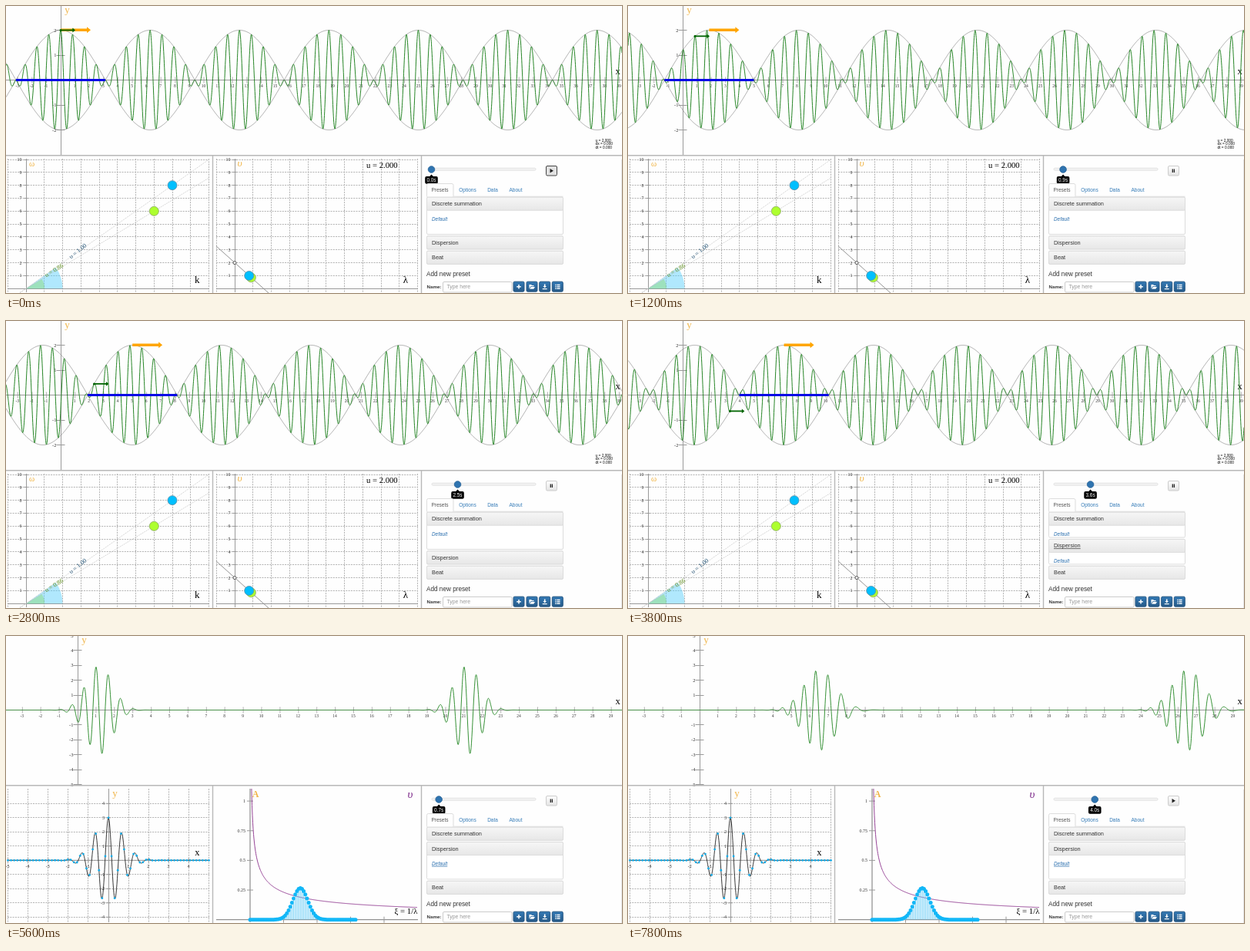
Animation, 800 px wide and 374 px high, one loop 8 s. Source, as an HTML page with a canvas:

```html
<!DOCTYPE html>
<html lang="en">
<head>
<meta charset="utf-8">
<title>Wave packets</title>
<style>
html, body { margin: 0; width: 100%; height: 100%; overflow: hidden; background: #fefefe; }
canvas { display: block; }
</style>
</head>
<body>
<canvas id="stage" width="800" height="374"></canvas>
<script>
const ctx = document.getElementById('stage').getContext('2d');
const SERIF = '"Liberation Serif", serif', SANS = '"Liberation Sans", sans-serif';
const GRAY = '#9a9a9a', INK = '#333', ORANGE = '#ffa500', AMBER = '#f0b548';
const SKY = '#00bfff', LIME = '#adff2f', LINK = '#337ab7';
const LOOP = 8, STEP = 0.2, SWITCH = 4.8, TAU = Math.PI * 2;

// [wall time, simulation time] in seconds
const BEAT_CLOCK = [[0.28, 0], [1.2, 0.93], [2.8, 2.52], [3.8, 3.56], [4.6, 4.335], [4.8, 4.53]];
const PACKET_CLOCK = [[4.885, 0], [7.2, 2.315], [7.8, 3.98]];

// Discrete spectrum of the packet 3 exp(-x²) cos(3πx), repeated every 20 units
const SPECTRUM = Array.from({ length: 64 }, (_, n) => {
  const xi = n * 0.05;
  return { xi, a: 0.2659 * Math.exp(-((xi - 1.5) ** 2) / (2 * 0.2251 ** 2)) };
});

function interpolate(points, time) {
  if (time <= points[0][0]) return points[0][1];
  for (let i = 1; i < points.length; i++) {
    const [x0, y0] = points[i - 1], [x1, y1] = points[i];
    if (time <= x1) return y0 + (y1 - y0) * (time - x0) / (x1 - x0);
  }
  return points[points.length - 1][1];
}

const range = (from, to, fn) => Array.from({ length: to - from + 1 }, (_, i) => fn(from + i));
const snap = v => Math.floor(v) + 0.5;

function text(str, x, y, size, color = '#000', { font = SERIF, align = 'center', style = '' } = {}) {
  ctx.font = `${style} ${size}px ${font}`;
  ctx.textAlign = align;
  ctx.textBaseline = 'alphabetic';
  ctx.fillStyle = color;
  ctx.fillText(str, x, y);
}

function line(x0, y0, x1, y1, color = GRAY, width = 1, dash = []) {
  ctx.beginPath();
  ctx.moveTo(x0, y0);
  ctx.lineTo(x1, y1);
  ctx.strokeStyle = color;
  ctx.lineWidth = width;
  ctx.setLineDash(dash);
  ctx.stroke();
  ctx.setLineDash([]);
}

function dot(x, y, r, fill, stroke) {
  ctx.beginPath();
  ctx.arc(x, y, r, 0, TAU);
  ctx.fillStyle = fill;
  ctx.fill();
  if (stroke) {
    ctx.strokeStyle = stroke;
    ctx.lineWidth = 0.8;
    ctx.stroke();
  }
}

function polygon(points, fill) {
  ctx.beginPath();
  points.forEach(([x, y]) => ctx.lineTo(x, y));
  ctx.fillStyle = fill;
  ctx.fill();
}

function box(x, y, w, h, fill, stroke, r = 0) {
  ctx.beginPath();
  ctx.roundRect(x, y, w, h, r);
  if (fill) { ctx.fillStyle = fill; ctx.fill(); }
  if (stroke) { ctx.strokeStyle = stroke; ctx.lineWidth = 1; ctx.stroke(); }
}

function shade(y, h, top, bottom) {
  const gradient = ctx.createLinearGradient(0, y, 0, y + h);
  gradient.addColorStop(0, top);
  gradient.addColorStop(1, bottom);
  return gradient;
}

function plot(fn, x0, x1, color, width = 1, step = 0.5) {
  ctx.beginPath();
  for (let x = x0; x <= x1; x += step) ctx.lineTo(x, fn(x));
  ctx.strokeStyle = color;
  ctx.lineWidth = width;
  ctx.stroke();
}

function clipped(x, y, w, h, draw) {
  ctx.save();
  ctx.beginPath();
  ctx.rect(x, y, w, h);
  ctx.clip();
  draw();
  ctx.restore();
}

function arrow(x, y, length, width, head, color) {
  line(x, y, x + length - head + 1, y, color, width);
  polygon([[x + length - head, y - head * 0.8], [x + length, y], [x + length - head, y + head * 0.8]], color);
}

function topAxes(ox, ux, uy, maxX, maxY) {
  line(0, 96.5, 800, 96.5);
  line(ox + 0.5, 0, ox + 0.5, 194);
  for (let i = -3; i <= maxX; i++) {
    if (!i) continue;
    line(ox + i * ux, 92.5, ox + i * ux, 100.5, GRAY, 0.8);
    text(i, ox + i * ux - 0.5, 106, 5.5, INK);
  }
  for (let i = -maxY; i <= maxY; i++) {
    if (!i) continue;
    line(ox - 5.5, snap(96.5 - i * uy), ox + 5.5, snap(96.5 - i * uy));
    text(i, ox - 5.5, 98.5 - i * uy, 6.5, INK, { align: 'right' });
  }
  text('y', ox + 8.5, 9, 13, AMBER);
  text('x', 794.5, 89, 12.5);
}

function grid(left, right, xs, ys) {
  const dash = [2, 1.3];
  xs.forEach(x => line(snap(x), 199, snap(x), 373, '#b2b2b2', 1, dash));
  ys.forEach(y => line(left, snap(y), right, snap(y), '#b2b2b2', 1, dash));
}

function gridPanel(ox, left, right) {
  const y = n => 368.3 - n * 16.83;
  grid(left, right, range(-1, 10, i => ox + i * 23.75).filter(x => x < right), range(1, 10, y));
  line(left, 368.5, right, 368.5);
  line(ox + 0.5, 199, ox + 0.5, 373);
  for (let i = 1; i <= 10; i++) {
    line(ox - 2.5, snap(y(i)), ox + 2.5, snap(y(i)));
    text(i, ox - 5.5, y(i) + 2, 6, INK, { align: 'right' });
  }
  return y;
}

function wedge(x, y, r, angle, fill) {
  ctx.beginPath();
  ctx.moveTo(x, y);
  ctx.arc(x, y, r, -angle, 0);
  ctx.closePath();
  ctx.fillStyle = fill;
  ctx.fill();
}

function rotatedText(str, x, y, angle, color) {
  ctx.save();
  ctx.translate(x, y);
  ctx.rotate(-angle);
  text(str, 0, 3, 8, color);
  ctx.restore();
}

function beatScene(t) {
  // The wave is drawn at a slightly finer scale than the tick marks
  const ox = 71, ux = 18.48, uy = 32.5, mid = 96.5;
  const toPixel = x => ox + x * ux, toUnit = p => (p - ox) / ux;
  const envelope = x => 2 * Math.cos((x - 2 * t) / 2);
  topAxes(ox, 18.6, uy, 39, 2);
  for (const sign of [1, -1]) plot(p => mid - sign * uy * envelope(toUnit(p)), 0, 800, '#8a8a8a', 0.7);
  plot(p => {
    const x = toUnit(p);
    return mid - uy * (Math.cos(8 * x - 8 * t) + Math.cos(7 * x - 6 * t));
  }, 0, 800, '#1b7f1b', 0.95, 0.25);

  line(toPixel(2 * t - Math.PI), mid, toPixel(2 * t + Math.PI), mid, '#0808e6', 3.2);
  arrow(toPixel(2 * t), 31.2, 39, 3.4, 5, ORANGE);
  const phaseX = 14 / 15 * t, phaseY = mid - uy * envelope(phaseX);
  dot(toPixel(phaseX), phaseY, 1.5, '#006400');
  arrow(toPixel(phaseX), phaseY, 19, 1.8, 3.6, '#006400');
  ['u = 2.000', 'dx = 0.000', 'dt = 0.000'].forEach((s, i) =>
    text(s, 765.5, 176.5 + i * 4.6, 4.8, '#000', { font: SANS, align: 'left' }));

  clipped(0, 196, 268, 178, () => {
    const y = gridPanel(26, 2, 264);
    const fast = Math.atan2(8 * 16.83, 8 * 23.75), slow = Math.atan2(6 * 16.83, 7 * 23.75);
    wedge(26, 368.3, 47.5, fast, 'rgba(80,205,250,.45)');
    wedge(26, 368.3, 24, slow, 'rgba(130,215,100,.42)');
    for (const a of [fast, slow])
      line(18, 368.3 + 8 * Math.tan(a), 264, 368.3 - 238 * Math.tan(a), '#bdbdbd', 0.8, [1, 1]);
    rotatedText('υ = 1.00', 93, 319, 0.68, '#1d4f73');
    rotatedText('υ = 0.86', 62, 344, 0.54, '#5f8f1a');
    dot(216, y(8), 6, SKY, '#5c8da5');
    dot(192.3, y(6), 6, LIME, '#8aa860');
    text('ω', 33.5, 208.7, 11, AMBER);
    text('k', 248.3, 361, 13);
  });

  clipped(270, 196, 268, 178, () => {
    const y = gridPanel(297, 273, 535);
    line(273, 312.9, 341.5, 374.5, '#888', 0.9);
    dot(297, y(2), 2, '#fff', '#333');
    dot(318.4, y(6 / 7), 6, LIME, '#8aa860');
    dot(315.7, y(1), 6, SKY, '#5c8da5');
    text('υ', 303.5, 209, 13.5, AMBER, { style: 'italic' });
    text('u = 2.000', 488.3, 211, 10.7);
    text('λ', 519, 361, 13);
  });
}

function packetScene(t) {
  const ox = 93, ux = 23.9, uy = 19.4;
  topAxes(ox, ux, uy, 29, 5);
  plot(p => {
    const x = (p - ox) / ux;
    let sum = 0;
    for (const { xi, a } of SPECTRUM) sum += a * Math.cos(TAU * (xi * x - 4 * Math.sqrt(xi) * t));
    return 96.5 - uy * sum;
  }, 0, 800, '#2c8c2c', 0.95);

  clipped(0, 196, 268, 178, () => {
    const cx = 133, cy = 292.3, sx = 26.1, sy = 18.5;
    const packet = x => 3 * Math.exp(-x * x) * Math.cos(3 * Math.PI * x);
    grid(2, 264, range(-5, 5, i => cx + i * sx), range(-4, 4, i => cy - i * sy));
    line(2, cy, 264, cy);
    line(cx + 0.5, 199, cx + 0.5, 373);
    for (let i = -5; i <= 4; i++) {
      if (!i) continue;
      line(cx + i * sx, cy - 3, cx + i * sx, cy + 3);
      text(i, cx + i * sx - 0.5, 302, 6, INK);
      if (i < -4) continue;
      line(cx - 3, cy - i * sy, cx + 3, cy - i * sy);
      text(i, cx - 5, cy - i * sy + 2, 6, INK, { align: 'right' });
    }
    plot(p => cy - sy * packet((p - cx) / sx), 2, 264, '#222', 0.9);
    for (let n = -32; n <= 32; n++) {
      const x = n * 0.15625;
      if (Math.abs(x) <= 5) dot(cx + x * sx, cy - sy * packet(x), 1.4, '#12abe8');
    }
    text('y', 141.5, 209, 13, AMBER);
    text('x', 248.3, 285.5, 12.5);
  });

  clipped(270, 196, 268, 178, () => {
    const cx = 317, base = 369.7, sx = 43.5, sy = 154.6;
    line(273, base, 535, base, '#777');
    line(cx, 199, cx, 373, '#777');
    for (let i = 1; i < 5; i++) {
      line(cx + i * sx, base - 4, cx + i * sx, base + 4);
      line(cx - 4, base - i * sy / 4, cx + 4, base - i * sy / 4);
      text(i / 4, cx - 6, base - i * sy / 4 + 2, 6, INK, { align: 'right' });
    }
    clipped(270, 199, 268, 175, () =>
      plot(p => base - 35.8 / Math.sqrt((p - cx) / sx), cx + 0.5, 534, '#8b2f8b', 0.9));
    for (const { xi, a } of SPECTRUM) {
      const x = cx + xi * sx, y = base - a * sy;
      line(x, base, x, y, '#58c8f5', 0.9);
      dot(x, y, 2.5, '#12b7f7');
    }
    text('A', 324, 209.5, 12, AMBER, { style: 'bold' });
    text('υ', 525, 211, 15, '#7d2a8a', { style: 'italic' });
    text('ξ = 1/λ', 519.5, 362, 10.8);
  });
}

function label(str, x, y, size, color, options = {}) {
  text(str, x, y, size, color, { font: SANS, align: 'left', ...options });
  if (options.underline) line(x, y + 1.3, x + ctx.measureText(str).width, y + 1.3, color, 0.7);
}

function section(title, y, bodyHeight, titleLine, linkLine) {
  box(546.5, y, 177, 17 + bodyHeight, '#fff', '#dcdcdc', 1.5);
  box(546.5, y, 177, 17, shade(y, 17, '#f6f6f6', '#e7e7e7'), '#dcdcdc', 1.5);
  label(title, 553, y + 10.9, 7.35, INK, { underline: titleLine });
  if (bodyHeight > 0) clipped(546, y + 17, 178, bodyHeight, () =>
    label('Default', 553, y + 30.3, 6.4, '#2a6fae', { style: 'italic', underline: linkLine }));
}

function iconButtons() {
  for (const x of [659, 676, 692.7, 709.3])
    box(x, 359.2, 14, 13, shade(359, 13, LINK, '#265a88'), '#245580', 1.5);
  const white = '#fff';
  line(663.2, 365.8, 668.8, 365.8, white, 1.5);
  line(666, 363, 666, 368.6, white, 1.5);
  polygon([[679.5, 363], [682, 363], [683, 364], [685.5, 364], [685.5, 365.3], [681.5, 365.3], [679.5, 368.5]], white);
  polygon([[682, 366], [687, 366], [685.3, 368.8], [680, 368.8]], white);
  line(699.7, 362.5, 699.7, 365.5, white, 1.6);
  polygon([[697.4, 365], [702, 365], [699.7, 367.6]], white);
  line(696.7, 368.7, 702.7, 368.7, white, 1.2);
  for (const y of [363.5, 365.9, 368.3]) line(713.2, y, 719.6, y, white, 1.4);
  line(715, 362, 715, 370, '#2c6a9f', 0.8);
}

function controls(time, t) {
  box(553, 211.2, 135, 3, '#f3f3f3', '#e2e2e2', 1.5);
  const x = 552.5 + 13.5 * t;
  dot(x, 213, 4.3, '#2f74b0', '#245f94');
  polygon([[x - 2.5, 222.3], [x, 219.5], [x + 2.5, 222.3]], '#000');
  box(x - 8.3, 222, 16.6, 9.7, '#000', null, 2);
  label(t.toFixed(1) + 's', x, 229.2, 6.4, '#fff', { align: 'center' });

  const pressed = time < 0.2, playing = !pressed && time < 7.8;
  const face = pressed ? '#e2e2e2' : shade(208, 13, '#fff', '#e4e4e4');
  box(701.5, 208.5, 14, 12.5, face, pressed ? '#444' : '#ccc', 1.5);
  if (playing) [707.3, 709.4].forEach(bar => line(bar, 212.5, bar, 217, '#222', 1.3));
  else polygon([[706.5, 212], [711, 214.7], [706.5, 217.4]], '#222');

  line(546, 248.2, 723.5, 248.2, '#ddd');
  box(546.5, 231.5, 34.5, 18, '#fefefe', '#ddd', 2);
  box(545, 248.7, 40, 1.5, '#fefefe');
  label('Presets', 563.5, 242, 6.5, '#555', { align: 'center' });
  [['Options', 599.5], ['Data', 632], ['About', 662]].forEach(([s, cx]) =>
    label(s, cx, 242, 6.5, LINK, { align: 'center' }));

  const open = time < 3.7 ? 31.3 : time < 3.9 ? 15.8 : 0;
  section('Discrete summation', 249.2, open, false, false);
  section('Dispersion', 268.6 + open, 31.3 - open, time >= 3.5 && time < SWITCH, time >= 4.3);
  section('Beat', 319.3, 0, false, false);

  label('Add new preset', 546, 352.2, 8.2, INK);
  label('Name:', 546.5, 367.8, 6.2, INK, { style: 'bold' });
  box(567.5, 359.5, 89.5, 13.5, '#fff', '#ccc', 1.5);
  label('Type here', 572.5, 368, 6.9, '#999');
  iconButtons();
}

function draw(time) {
  ctx.fillStyle = '#fefefe';
  ctx.fillRect(0, 0, 800, 374);
  const beat = time < SWITCH;
  const t = interpolate(beat ? BEAT_CLOCK : PACKET_CLOCK, time);
  (beat ? beatScene : packetScene)(t);
  line(0, 194.8, 800, 194.8, '#b8b8b8', 1.4);
  line(268.5, 195, 268.5, 374, '#b8b8b8', 1.4);
  line(539.5, 195, 539.5, 374, '#b8b8b8', 1.4);
  line(799.5, 200, 799.5, 374, '#e4e4e4');
  controls(time, t);
}

const start = performance.now();
function tick() {
  const elapsed = (performance.now() - start) / 1000 % LOOP;
  draw(Math.floor(elapsed / STEP + 1e-6) * STEP + 1e-6);
  requestAnimationFrame(tick);
}
tick();
</script>
</body>
</html>
```
